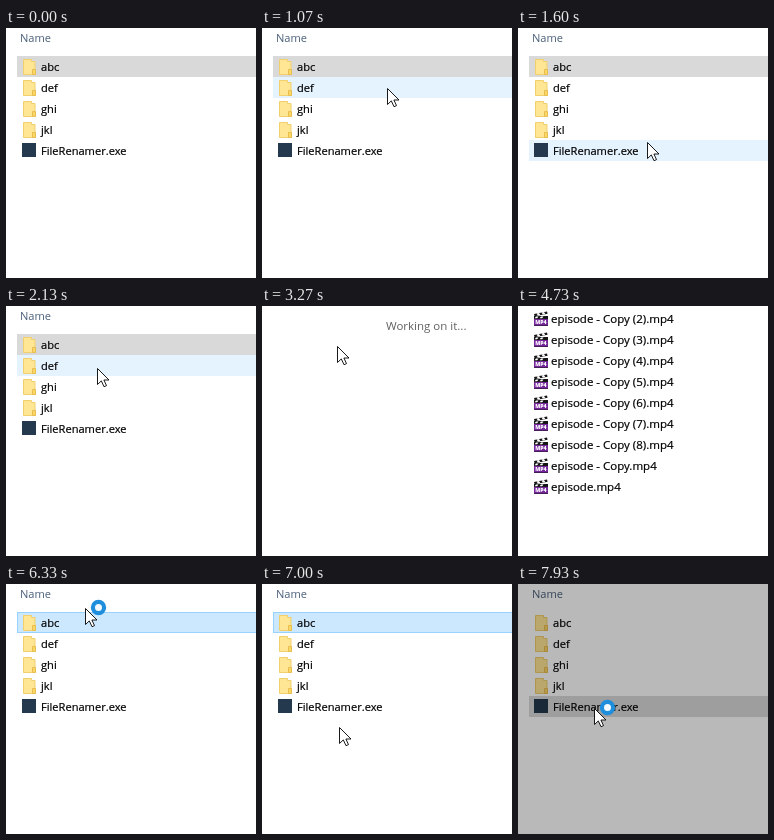
An HTML page that plays this animation: 250x250 px, repeating every 8000 ms.

```html
<!DOCTYPE html>
<html lang="en">
<head>
<meta charset="utf-8">
<title>Opening a folder</title>
<style>
  html, body { margin: 0; width: 100%; height: 100%; overflow: hidden; background: #fff; }
  svg { display: block; width: 100vw; height: 100vh; }
  text { font-family: "Open Sans", "Noto Sans", sans-serif; font-size: 11.5px; white-space: pre; }
  #folders text { font-size: 11.1px; }
  .label { fill: #000; stroke: #000; stroke-width: .2; }
  .heading { fill: #4c607a; }
  .note { fill: #606060; }
  text.badge { font-size: 5.2px; font-weight: 800; fill: #fff; }
</style>
</head>
<body>
<svg viewBox="0 0 250 250">
  <defs>
    <g id="folder">
      <path d="M17.5 3.5h8v2h3.500v13h-11.500z" fill="#ffe694" stroke="#f0cf6c"/>
      <path d="M26.500 13.500h3v5h-3z" fill="#fbd766" stroke="#e8bd4f"/>
    </g>
    <rect id="program" x="16" y="3" width="14" height="14" fill="#24394d"/>
    <g id="video">
      <path d="M16 5L29 2.500L29.600 4.800L16.600 7.300zM16 7h14v10h-14z" fill="#151515"/>
      <path d="M18.500 4.600l2.500-.5 1.300 1.800-2.500.5zM23.500 3.600l2.500-.5 1.300 1.800-2.500.5zM18 7.500h2.500l-1.300 1.800h-2.500zM23 7.500h2.500l-1.300 1.800h-2.500z" fill="#fff"/>
      <path d="M16 10h14v6.500h-14z" fill="#74269a"/>
      <text class="badge" x="23" y="15.200" text-anchor="middle">MP4</text>
    </g>
  </defs>

  <rect id="row" x="11" width="240" height="21"/>
  <rect id="hover" x="11" width="240" fill="#e5f3ff"/>
  <g id="folders"><text class="heading" x="14" y="14">Name</text></g>
  <g id="videos"></g>
  <text id="working" class="note" x="124" y="24">Working on it...</text>
  <rect id="dim" width="250" height="250" fill="#000" opacity=".275"/>
  <g id="pointer">
    <path d="M.5 .5V16.500L4.300 12.900L7 18.700L9.500 17.600L6.900 12H12z" fill="#fff" stroke="#000" stroke-width=".9"/>
    <circle id="busy" cx="13.500" cy="-.5" r="5.600" fill="#f2faff" stroke="#1f8fdd" stroke-width="4.200"/>
  </g>
</svg>
<script>
const LOOP = 8000, STEP = 1000 / 15, ROW = 21;
const $ = id => document.getElementById(id);
const show = (el, on) => el.style.display = on ? '' : 'none';

const lists = {
  folders: {
    top: 28, textX: 35, baseline: 15, hoverHeight: 21,
    names: ['abc', 'def', 'ghi', 'jkl', 'FileRenamer.exe']
  },
  videos: {
    top: 3, textX: 33, baseline: 14, hoverHeight: 20,
    names: [...Array.from({ length: 7 }, (_, i) => `episode - Copy (${i + 2}).mp4`),
      'episode - Copy.mp4', 'episode.mp4']
  }
};

function addNode(parent, tag, attrs, text = '') {
  const node = document.createElementNS('http://www.w3.org/2000/svg', tag);
  for (const key in attrs) node.setAttribute(key, attrs[key]);
  node.textContent = text;
  parent.append(node);
}

for (const [id, { top, textX, baseline, names }] of Object.entries(lists)) {
  names.forEach((name, i) => {
    const y = top + i * ROW;
    const icon = id === 'videos' ? 'video' : name.endsWith('.exe') ? 'program' : 'folder';
    addNode($(id), 'use', { href: '#' + icon, y });
    addNode($(id), 'text', { class: 'label', x: textX, y: y + baseline }, name);
  });
}

// Pointer strokes: [ms, x, y]; the pointer is off stage between them.
const strokes = [
  [[400, 112, 243], [800, 122, 135], [1130, 126, 42], [1200, 127, 40], [1600, 129, 114],
   [1730, 130, 121], [2070, 98, 72], [2270, 75, 40], [3800, 75, 40], [4070, 62, 134],
   [4270, 47, 75], [4600, 36, 27], [4670, 32, 15], [4725, 32, 15]],
  [[6060, 2, 2], [6330, 79, 23], [6600, 82, 95], [6800, 80, 133], [7000, 77, 143],
   [7200, 76, 124], [8000, 76, 124]]
];

function pointerAt(t) {
  for (const stroke of strokes) {
    for (let i = 1; i < stroke.length; i++) {
      const [t0, x0, y0] = stroke[i - 1], [t1, x1, y1] = stroke[i];
      if (t < t0 || t > t1) continue;
      const k = (t - t0) / (t1 - t0);
      return { x: Math.round(x0 + (x1 - x0) * k), y: Math.round(y0 + (y1 - y0) * k) };
    }
  }
  return null;
}

const within = (t, from, to) => t >= from && t < to;

function selectionAt(t, overFirst) {
  if (t < 2260) return { index: 0, fill: overFirst ? '#cce8ff' : '#d9d9d9' };
  if (t < 7660) return { index: 0, fill: '#cce8ff', border: true };
  if (t < 7930) return { index: 4, fill: '#cce8ff', border: true };
  return { index: 4, fill: '#d9d9d9' };
}

function draw(t) {
  const view = within(t, 3265, 3395) || within(t, 5795, 5995) ? 'working'
    : within(t, 3395, 5795) ? 'videos' : 'folders';
  for (const id of ['folders', 'videos', 'working']) show($(id), id === view);

  const pointer = pointerAt(t);
  const list = lists[view];
  const over = pointer && list ? Math.floor((pointer.y - list.top) / ROW) : -1;
  const selection = view === 'folders' ? selectionAt(t, over === 0) : null;

  show($('row'), selection);
  if (selection) {
    const inset = selection.border ? .5 : 0;
    $('row').setAttribute('x', 11 + inset);
    $('row').setAttribute('y', list.top + selection.index * ROW + inset);
    $('row').setAttribute('height', ROW - inset * 2);
    $('row').setAttribute('fill', selection.fill);
    $('row').setAttribute('stroke', selection.border ? '#99d1ff' : 'none');
  }

  const hovering = list && over >= 0 && over < list.names.length && over !== selection?.index;
  show($('hover'), hovering);
  if (hovering) {
    $('hover').setAttribute('y', list.top + over * ROW);
    $('hover').setAttribute('height', list.hoverHeight);
  }

  show($('pointer'), pointer);
  if (pointer) $('pointer').setAttribute('transform', `translate(${pointer.x} ${pointer.y})`);
  show($('busy'), within(t, 3795, 4725) || within(t, 6000, 6600) || t >= 7660);
  show($('dim'), t >= 7925);
}

const start = performance.now();
function tick() {
  const t = (performance.now() - start) % LOOP;
  draw(Math.floor((t + 4) / STEP) * STEP);
  requestAnimationFrame(tick);
}
tick();
</script>
</body>
</html>
```
